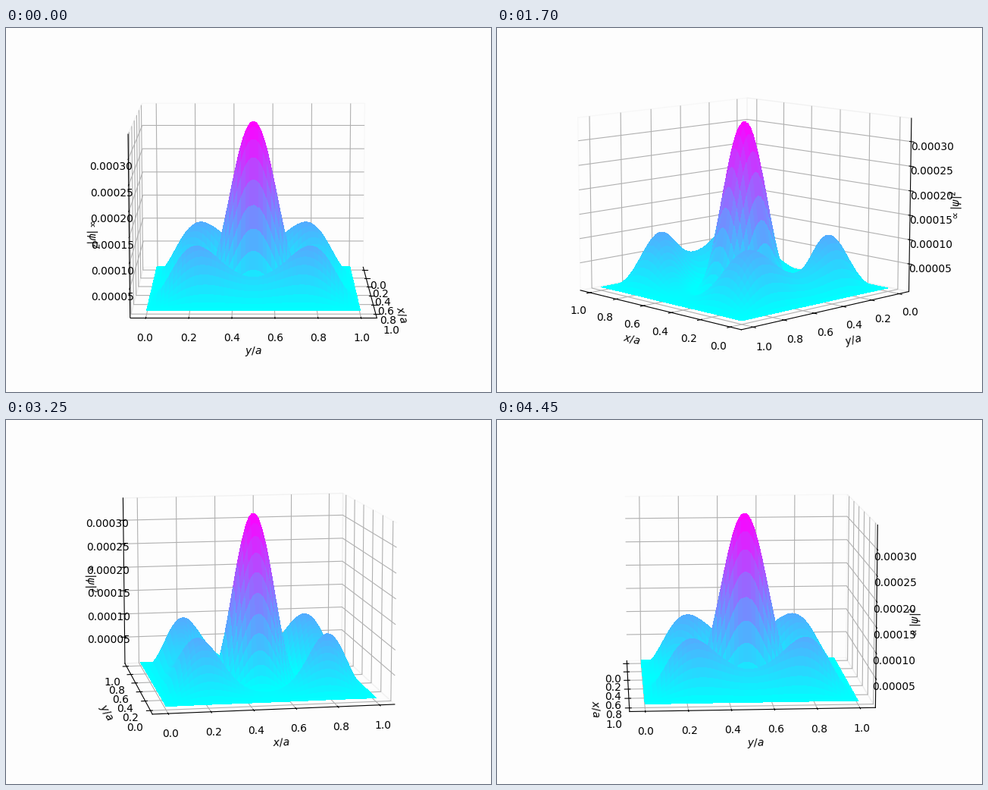
Recreate the animation shown at these times as a matplotlib script. Size 640x480 px, loop 4.5 s.

```python
import numpy as np
import matplotlib.pyplot as plt
from matplotlib.animation import FuncAnimation

FRAMES, INTERVAL = 90, 50
N = 150            # grid points per side of the box
MIX = 0.7          # weight of the second degenerate state
VIEW_MARGIN = 1 / 48


def padded(low, high, margin):
    pad = (high - low) * margin
    return low - pad, high + pad


def density():
    """Normalised |psi|^2 for a mix of the (3,1) and (1,3) box states."""
    t = np.pi * np.arange(1, N + 1) / (N + 1)
    s1, s3 = np.sin(t), np.sin(3 * t)
    psi = np.outer(s1, s3) + MIX * np.outer(s3, s1)   # rows: y, columns: x
    return psi**2 / np.sum(psi**2)


fig = plt.figure(figsize=(6.4, 4.8), dpi=100, facecolor="#fdfdfd")
ax = fig.add_axes([0, 0, 1, 1], projection="3d", facecolor="none")

prob = density()
x, y = np.meshgrid(np.linspace(0, 1, N), np.linspace(0, 1, N))
ax.plot_surface(x, y, prob, cmap="cool", linewidth=0, antialiased=False)

side = padded(*padded(0, 1, 0.05), VIEW_MARGIN)
ax.set(xlim=side, ylim=side, zlim=padded(prob.min(), prob.max(), VIEW_MARGIN))
ax.set_xticks(np.linspace(0, 1, 6))
ax.set_yticks(np.linspace(0, 1, 6))
ax.set_zticks(np.arange(1, 7) * 5e-5)
ax.zaxis.set_major_formatter("{x:.5f}")
ax.set(xlabel="$x/a$", ylabel="$y/a$", zlabel=r"$\propto|\psi|^2$")
for axis in (ax.xaxis, ax.yaxis, ax.zaxis):
    axis.pane.fill = False


def rotate(frame):
    ax.view_init(elev=10, azim=frame * 360 / FRAMES)
    return ()


anim = FuncAnimation(fig, rotate, frames=FRAMES, interval=INTERVAL,
                     init_func=lambda: (), repeat=True)
plt.show()
```
